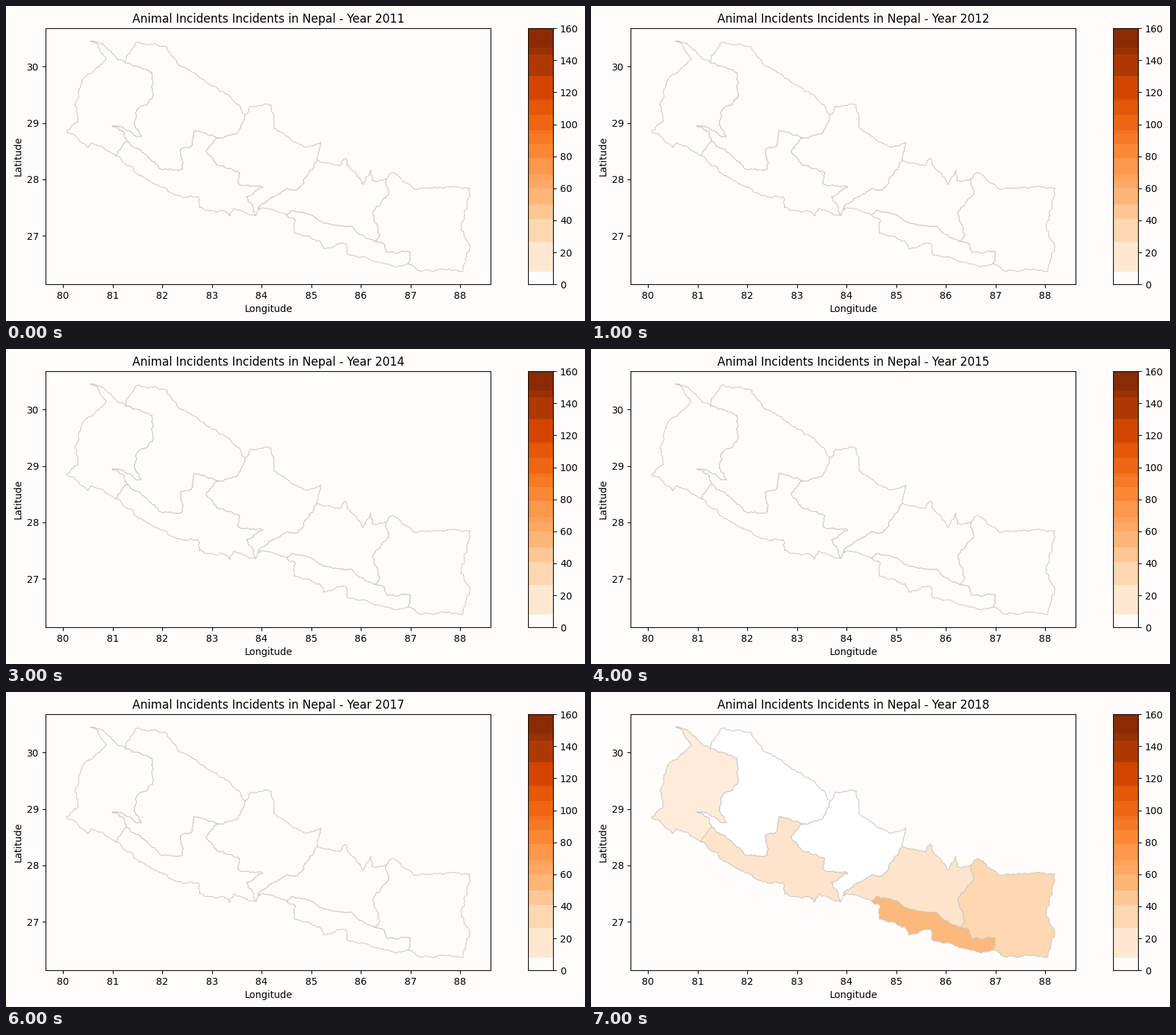
Recreate the animation shown at these times as a matplotlib script. Size 834 by 454 pixels, loop 8000 ms.

```python
import numpy as np
import matplotlib.pyplot as plt
from matplotlib.animation import FuncAnimation
from matplotlib.patches import Polygon

W, H, DPI = 834, 454, 100
PAPER = "#fefdfc"
TOP_COUNT = 160
X80, Y30, DEG_X, DEG_Y = 82, 87, 71.5, 81.35  # stage pixels per degree

plt.rcParams["font.family"] = "DejaVu Sans"

# Stage points where borders meet.
NODES = dict(A=(172, 82), B=(174, 195), C=(158, 216), D=(344, 156),
             E=(306, 190), F=(448, 222), G=(360, 302), H=(364, 289),
             I=(404, 301), J=(548, 249), K=(530, 339), L=(579, 371))

# Key points of each border between its two nodes.
BORDERS = {
    "CA": [(123, 197), (118, 204), (87, 181), (104, 166), (99, 142),
           (110, 106), (144, 76), (132, 57), (121, 50), (139, 54)],
    "AB": [(189, 87), (210, 95), (211, 133), (188, 150), (184, 171),
           (195, 188), (152, 173), (168, 180)],
    "BC": [],
    "AD": [(173, 72), (186, 53), (232, 60), (246, 82), (278, 103), (314, 124)],
    "DE": [(331, 184)],
    "BE": [(225, 236), (254, 235), (251, 207), (269, 199), (271, 179)],
    "DF": [(352, 144), (382, 143), (386, 175), (431, 203), (453, 196)],
    "EG": [(288, 209), (304, 229), (337, 240), (334, 256), (370, 261),
           (346, 274)],
    "FH": [(437, 237), (420, 265), (404, 263)],
    "CG": [(190, 243), (256, 276), (276, 274), (278, 290), (313, 295),
           (321, 303), (328, 291)],
    "FJ": [(481, 230), (489, 219), (495, 234), (515, 257), (525, 236),
           (527, 252)],
    "HI": [(364, 294), (376, 291)],
    "IK": [(410, 295), (440, 301), (460, 313), (497, 317)],
    "JK": [(551, 272), (528, 299), (538, 330)],
    "KL": [(544, 342), (550, 355), (583, 354)],
    "IL": [(417, 308), (415, 327), (452, 338), (457, 350), (488, 342),
           (492, 358), (562, 376)],
    "LJ": [(592, 380), (658, 382), (668, 348), (655, 322), (668, 262),
           (592, 264), (556, 240)],
}

# Nodes around each province and its incidents in the last year.
PROVINCES = {"CABC": 12, "ADEBA": 0, "CGEBC": 22, "DFHGED": 0,
             "FJKIHF": 22, "ILKI": 54, "LJKL": 33}

STEPS = [0, 8, 26.5, 41, 50, 60, 65.5, 69, 79, 87.5, 94, 96.5, 106, 114.5,
         116, 130, 143.5, 148, 160]


def shade(count):
    return plt.cm.Oranges(count / TOP_COUNT) if count else "white"


def roughen(points, rng, finest=3):
    """Split segments at their middles, each with a small sideways step."""
    pts = np.array(points, float)
    while True:
        step = np.diff(pts, axis=0)
        size = np.hypot(*step.T)[:, None]
        if size.max() < finest:
            return pts
        side = np.column_stack([-step[:, 1], step[:, 0]]) / size
        reach = np.minimum(0.2 * size, 2)
        mid = pts[:-1] + step / 2 + side * reach * rng.uniform(-1, 1, size.shape)
        out = np.empty((2 * len(pts) - 1, 2))
        out[::2], out[1::2] = pts, mid
        pts = out


def to_degrees(pts):
    x, y = np.asarray(pts, float).T
    return np.column_stack([80 + (x - X80) / DEG_X, 30 - (y - Y30) / DEG_Y])


def side_of(start, end):
    """The border from start to end, walked in that direction."""
    if start + end in lines:
        return lines[start + end]
    if end + start in lines:
        return lines[end + start][::-1]
    return [NODES[start], NODES[end]]


def ring(path):
    return to_degrees(np.vstack([side_of(a, b) for a, b in zip(path, path[1:])]))


def add_axes(left, top, right, bottom, shift=0.2):
    box = [(left + shift) / W, 1 - (bottom + shift) / H,
           (right - left) / W, (bottom - top) / H]
    return fig.add_axes(box, facecolor=PAPER)


rng = np.random.default_rng(4)
lines = {ends: roughen([NODES[ends[0]], *pts, NODES[ends[1]]], rng)
         for ends, pts in BORDERS.items()}

fig = plt.figure(figsize=(W / DPI, H / DPI), dpi=DPI, facecolor=PAPER)

ax = add_axes(57, 32, 698, 401)
(west, north), (east, south) = to_degrees([(57, 32), (698, 401)])
ax.set(xlim=(west, east), ylim=(south, north),
       xticks=range(80, 89), yticks=range(27, 31),
       xlabel="Longitude", ylabel="Latitude")
title = ax.set_title("")
shapes = [ax.add_patch(Polygon(ring(path), closed=True, lw=0.8, ec="#cdc9c6"))
          for path in PROVINCES]

bar = add_axes(752, 32, 788, 401)
bar.set(xlim=(0, 1), ylim=(0, TOP_COUNT), xticks=[],
        yticks=range(0, TOP_COUNT + 1, 20))
bar.yaxis.tick_right()
for low, high in zip(STEPS[1:], STEPS[2:]):
    bar.axhspan(low, high, color=shade((low + high) / 2), lw=0)


def draw(i):
    year = 2011 + i
    title.set_text(f"Animal Incidents Incidents in Nepal - Year {year}")
    for shape, count in zip(shapes, PROVINCES.values()):
        shape.set_facecolor(shade(count) if year == 2018 else PAPER)
    return [title, *shapes]


anim = FuncAnimation(fig, draw, frames=8, interval=1000, repeat=True,
                     repeat_delay=0, blit=False)
plt.show()
```
